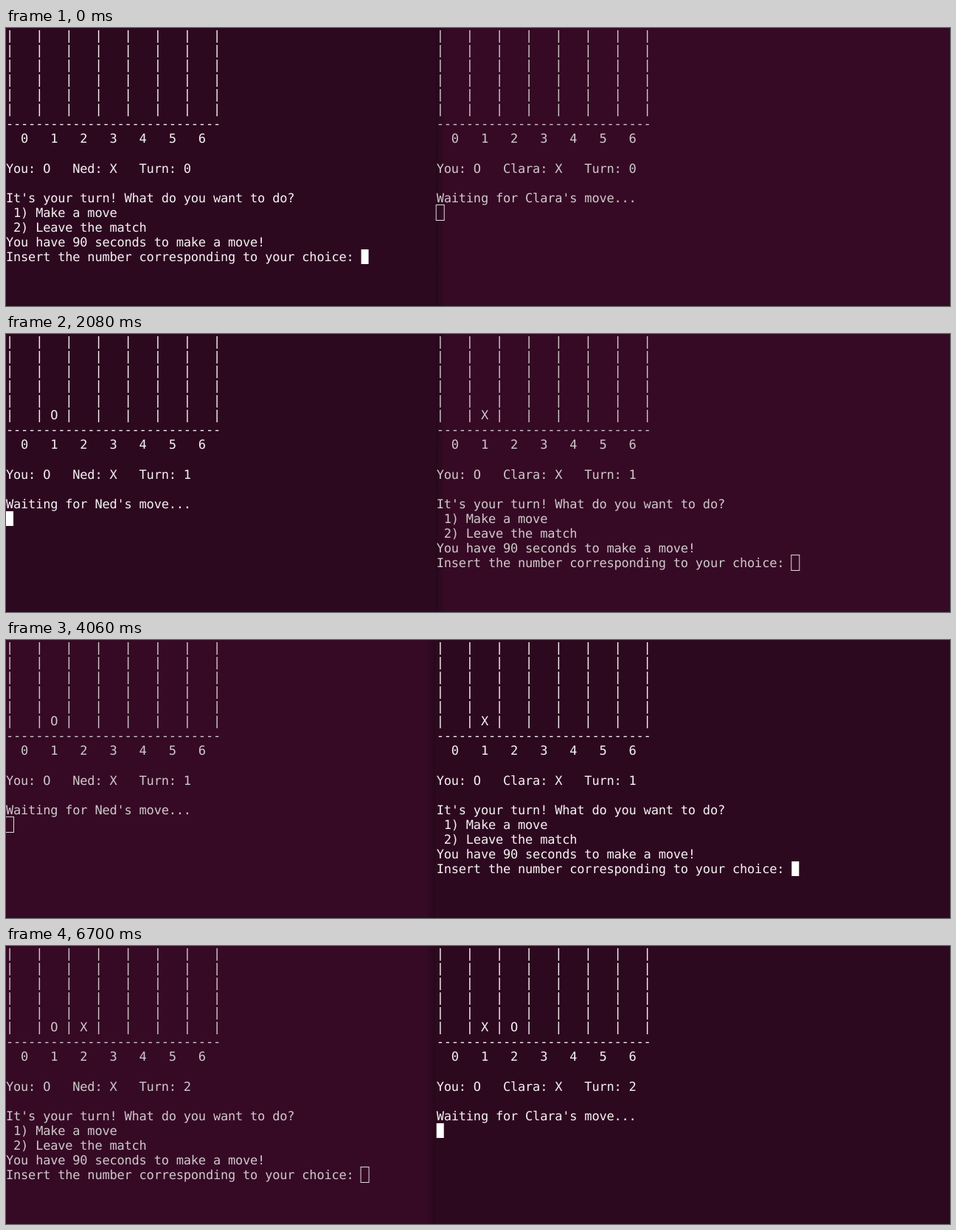
These frames come from a looping animation (1280 px wide and 378 px high, 8000 ms). An HTML page:

```html
<!DOCTYPE html>
<html lang="en">
<head>
<meta charset="utf-8">
<title>Two terminals, one match</title>
<style>
  html, body { margin: 0; width: 100%; height: 100%; overflow: hidden; background: #360a25; }
  svg { display: block; width: 1280px; height: 378px; }
  text {
    font: 17px "DejaVu Sans Mono", monospace;
    letter-spacing: -0.202px;
    white-space: pre;
    text-rendering: geometricPrecision;
  }
</style>
</head>
<body>
<svg id="stage" viewBox="0 0 1280 378">
  <defs>
    <linearGradient id="toRight"><stop offset="0" stop-color="#1c0614" stop-opacity=".45"/><stop offset="1" stop-color="#1c0614" stop-opacity="0"/></linearGradient>
    <linearGradient id="toLeft"><stop offset="0" stop-color="#1c0614" stop-opacity="0"/><stop offset="1" stop-color="#1c0614" stop-opacity=".45"/></linearGradient>
  </defs>
</svg>
<script>
const LOOP = 8000, CELL_W = 10.033, CELL_H = 20.06, ROWS = 17;
const ACTIVE = { bg: [45, 9, 32], ink: [246, 242, 244] };
const IDLE = { bg: [54, 10, 37], ink: [208, 200, 204] };
const ASK = "Insert the number corresponding to your choice: ";
const COLUMN = "Insert a column number between 0 and 6: ";

const stage = document.getElementById("stage");

function add(tag, attrs, parent = stage) {
  const node = document.createElementNS("http://www.w3.org/2000/svg", tag);
  set(node, attrs);
  parent.append(node);
  return node;
}

function set(node, attrs) {
  for (const key in attrs) node.setAttribute(key, attrs[key]);
}

const mix = (a, b, k) => `rgb(${a.map((v, i) => Math.round(v + (b[i] - v) * k))})`;

// Match text: a board, a status line, then either a prompt or a wait.
function board(cells) {
  const row = c => "|" + [...c].map(v => ` ${v} |`).join("");
  return [...Array(5).fill(row("       ")), row(cells.padEnd(7)),
    "-".repeat(29), "  0   1   2   3   4   5   6", ""];
}

function screen(rival, cells, turn, body) {
  return [...board(cells), `You: O   ${rival}: X   Turn: ${turn}`, "", ...body];
}

const prompt = (...input) => ["It's your turn! What do you want to do?", " 1) Make a move",
  " 2) Leave the match", "You have 90 seconds to make a move!", ...input];
const wait = rival => [`Waiting for ${rival}'s move...`, ""];

const left = (cells, turn, body) => screen("Ned", cells, turn, body);
const right = (cells, turn, body) => screen("Clara", cells, turn, body);

const leftSteps = [
  [0, left("", 0, prompt(ASK))],
  [960, left("", 0, prompt(ASK + "1"))],
  [1140, left("", 0, prompt(ASK + "1", COLUMN))],
  [1700, left("", 0, prompt(ASK + "1", COLUMN + "1"))],
  [2080, left(" O", 1, wait("Ned"))],
  [6700, left(" OX", 2, prompt(ASK))]
];
const rightSteps = [
  [0, right("", 0, wait("Clara"))],
  [2080, right(" X", 1, prompt(ASK))],
  [5060, right(" X", 1, prompt(ASK + "1"))],
  [5460, right(" X", 1, prompt(ASK + "1", COLUMN))],
  [6180, right(" X", 1, prompt(ASK + "1", COLUMN + "2"))],
  [6700, right(" XO", 2, wait("Clara"))]
];
// Share of the focus that has moved to the right pane.
const focusSteps = [[0, 0], [3900, 1 / 3], [3980, 2 / 3], [4060, 1]];
const blinkSteps = [[0, true], [3620, false], [3900, true]];

const at = (steps, t) => steps.findLast(s => s[0] <= t)[1];

function makePane(x, steps) {
  const group = add("g", {});
  const lines = Array.from({ length: ROWS }, (_, i) =>
    add("text", { x, y: Math.round(i * CELL_H) + 16 }, group));
  return { x, steps, group, lines, cursor: add("rect", {}, group), shown: null };
}

function drawPane(pane, t, focus, active) {
  const text = at(pane.steps, t);
  if (text !== pane.shown) {
    pane.lines.forEach((line, i) => { line.textContent = text[i] || ""; });
    pane.shown = text;
  }
  set(pane.group, { fill: mix(IDLE.ink, ACTIVE.ink, focus) });

  // The cursor follows the last character; it is hollow without focus.
  const row = text.length - 1;
  const x = pane.x + text[row].length * CELL_W, y = Math.round(row * CELL_H);
  set(pane.cursor, active
    ? { x, y, width: CELL_W, height: 20, fill: "#fff", stroke: "none" }
    : { x: x - 0.5, y: y - 0.5, width: 11, height: 21, fill: "none", stroke: "#e2dade" });
  set(pane.cursor, { visibility: active && !at(blinkSteps, t) ? "hidden" : "visible" });
}

const leftBg = add("rect", { width: 584, height: 378 });
const rightBg = add("rect", { height: 378 });
const shadow = add("rect", { width: 13, height: 378 });
const edge = add("rect", { width: 1, height: 378, fill: "#23071a" });
const leftPane = makePane(0, leftSteps);
const rightPane = makePane(583.7, rightSteps);

function draw(t) {
  const k = at(focusSteps, t), onRight = k > 0;
  const split = onRight ? 581 : 583;
  set(leftBg, { fill: mix(ACTIVE.bg, IDLE.bg, k) });
  set(rightBg, { x: split, width: 1280 - split, fill: mix(IDLE.bg, ACTIVE.bg, k) });
  set(shadow, { x: onRight ? split - 13 : split + 1, fill: `url(#${onRight ? "toLeft" : "toRight"})` });
  set(edge, { x: split });
  drawPane(leftPane, t, 1 - k, !onRight);
  drawPane(rightPane, t, k, onRight);
}

const start = performance.now();
function tick() {
  draw((performance.now() - start) % LOOP);
  requestAnimationFrame(tick);
}
tick();
</script>
</body>
</html>
```
